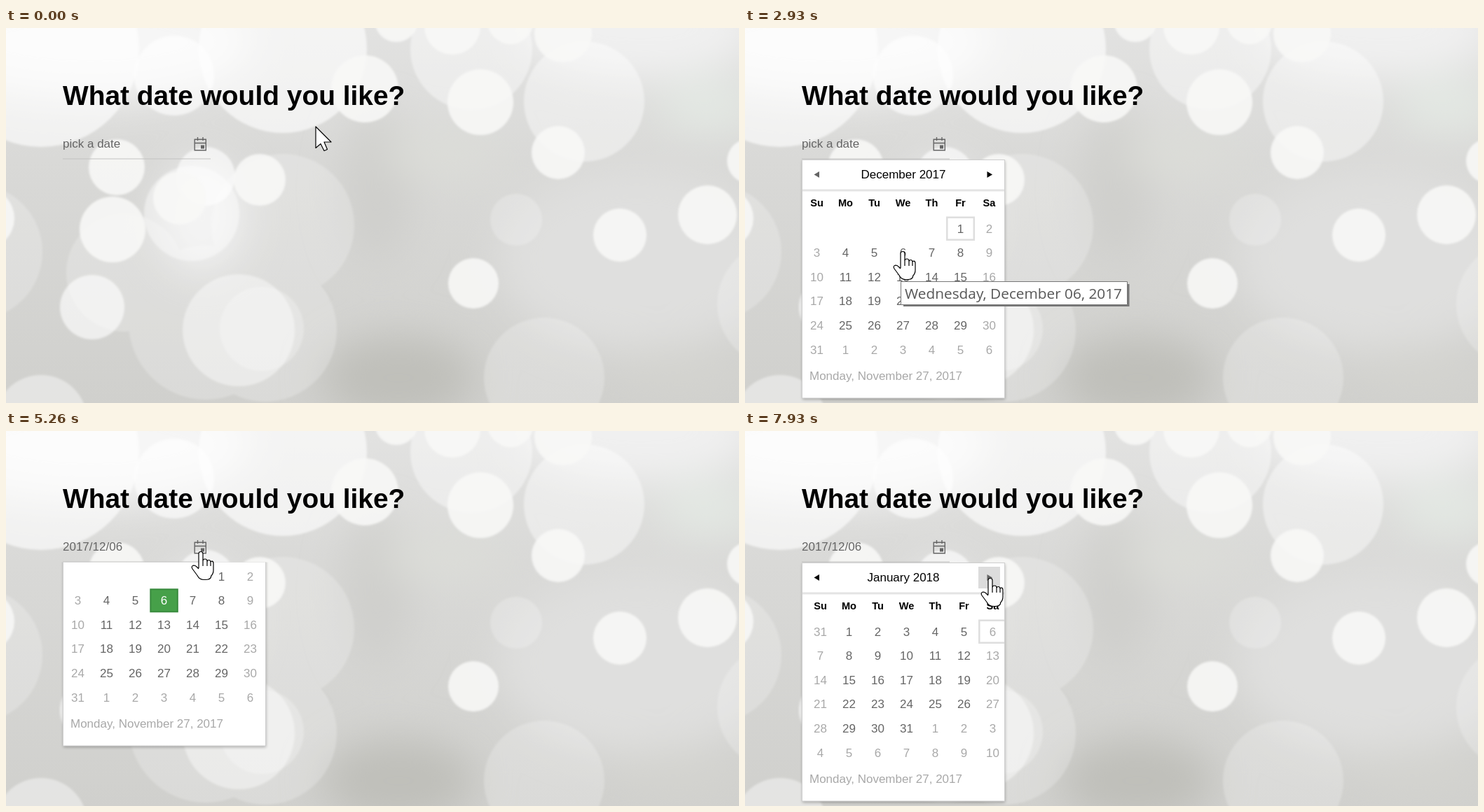
These frames come from a looping animation (1046 by 536 pixels, 8000 ms). An HTML page:

```html
<!DOCTYPE html>
<html lang="en">
<head>
<meta charset="utf-8">
<title>Date picker</title>
<style>
  html, body { margin: 0; width: 100%; height: 100%; overflow: hidden; background: #dadad8; }
  svg { display: block; width: 1046px; height: 536px; }
  text { font: 17px "Liberation Sans", Arial, sans-serif; fill: #656565; }
  .mid { text-anchor: middle; }
  .muted { fill: #a8a8a8; }
  .dark { fill: #000; }
  .week { font-size: 14.6px; font-weight: bold; fill: #000; }
  .title { font-size: 38.9px; font-weight: bold; fill: #000; }
  .tip { font: 20.8px "Open Sans", "Noto Sans", sans-serif; fill: #575757; }
  .focus { fill: #fff; stroke: #dedede; stroke-width: 2.5; }
  .hover { fill: #dcdcdc; }
  .cursor { fill: #fff; stroke: #000; stroke-width: 1.2; stroke-linejoin: round; }
</style>
</head>
<body>
<svg viewBox="0 0 1046 536">
  <defs>
    <filter id="soft" x="-10%" y="-10%" width="120%" height="120%"><feGaussianBlur stdDeviation="1.6"/></filter>
    <filter id="haze" x="-50%" y="-50%" width="200%" height="200%"><feGaussianBlur stdDeviation="28"/></filter>
    <filter id="shade" x="-5%" y="-5%" width="110%" height="110%"><feGaussianBlur stdDeviation="2"/></filter>
    <linearGradient id="base" x2="0" y2="1">
      <stop offset="0" stop-color="#e2e2e1"/>
      <stop offset=".35" stop-color="#d9d9d7"/>
      <stop offset="1" stop-color="#d0d0cd"/>
    </linearGradient>
    <clipPath id="drop"><path d="M70 187.5H385V536H70z"/></clipPath>
    <clipPath id="pane"><path d="M82 235H370V482H82z"/></clipPath>
  </defs>

  <rect width="1046" height="536" fill="url(#base)"/>
  <g filter="url(#haze)">
    <ellipse cx="560" cy="500" rx="110" ry="60" fill="#bfbfba"/>
    <ellipse cx="530" cy="230" rx="50" ry="110" fill="#cfcfcc"/>
    <ellipse cx="620" cy="180" rx="90" ry="30" fill="#dcddd8"/>
    <ellipse cx="900" cy="330" rx="200" ry="130" fill="#dfdfde"/>
    <ellipse cx="960" cy="490" rx="90" ry="40" fill="#d3d3cf"/>
    <ellipse cx="120" cy="20" rx="230" ry="80" fill="#f6f6f6"/>
    <ellipse cx="900" cy="0" rx="170" ry="70" fill="#f0f0f0"/>
    <ellipse cx="1000" cy="110" rx="70" ry="40" fill="#e3e8e3"/>
    <ellipse cx="280" cy="270" rx="60" ry="80" fill="#ececec"/>
  </g>
  <g fill="#fff" filter="url(#soft)">
    <g opacity=".22">
      <circle cx="395" cy="282" r="102"/>
      <circle cx="285" cy="421" r="110"/>
      <circle cx="370" cy="432" r="102"/>
      <circle cx="170" cy="350" r="84"/>
      <circle cx="-45" cy="320" r="97"/>
      <circle cx="768" cy="500" r="86"/>
      <circle cx="1105" cy="395" r="90"/>
      <circle cx="728" cy="274" r="37"/>
    </g>
    <g fill-opacity=".42">
      <circle cx="332" cy="432" r="80"/>
      <circle cx="265" cy="265" r="68"/>
      <circle cx="664" cy="30" r="87"/>
      <circle cx="825" cy="105" r="86"/>
      <circle cx="50" cy="562" r="66"/>
      <circle cx="365" cy="430" r="60" fill-opacity=".25"/>
    </g>
    <g fill-opacity=".62">
      <circle cx="395" cy="30" r="120"/>
      <circle cx="50" cy="30" r="140"/>
      <circle cx="240" cy="68" r="57"/>
      <circle cx="123" cy="399" r="46"/>
      <circle cx="285" cy="212" r="42"/>
    </g>
    <g fill="#f9f9f8" fill-opacity=".88">
      <circle cx="512" cy="87" r="48"/>
      <circle cx="677" cy="106" r="47"/>
      <circle cx="557" cy="-11" r="31"/>
      <circle cx="637" cy="-2" r="40"/>
      <circle cx="720" cy="-10" r="33"/>
      <circle cx="795" cy="8" r="41"/>
      <circle cx="788" cy="178" r="38"/>
      <circle cx="876" cy="296" r="38"/>
      <circle cx="1001" cy="267" r="42"/>
      <circle cx="667" cy="365" r="36"/>
      <circle cx="1061" cy="190" r="32"/>
      <circle cx="158" cy="199" r="40"/>
      <circle cx="152" cy="288" r="47"/>
      <circle cx="362" cy="217" r="37"/>
      <circle cx="248" cy="243" r="38"/>
      <circle cx="-32" cy="272" r="44"/>
    </g>
  </g>

  <text class="title" x="81" y="110">What date would you like?</text>
  <text id="field" x="81" y="171"></text>
  <path d="M81 187H292" stroke="#c2c2c1"/>
  <g fill="none" stroke="#656565" stroke-width="1.4">
    <path d="M269.2 159.2H285.3V174.8H269.2zM269.2 164.5H285.3M273.5 156V161M281 156V161"/>
    <path d="M278 167.5h5v5h-5z" fill="#656565" stroke="none"/>
  </g>

  <g clip-path="url(#drop)">
    <g id="popup">
      <rect x="82" y="190" width="289" height="341" fill="#000" opacity=".28" filter="url(#shade)"/>
      <rect x="81.5" y="188.5" width="289" height="340.5" fill="#fff" stroke="#cfcfcf"/>
      <rect id="titleHover" class="hover" x="124" y="194" width="205" height="31"/>
      <rect id="nextHover" class="hover" x="333" y="194" width="31" height="31"/>
      <path id="prev" d="M106 205V214L98.500 209.500z"/>
      <path id="next" d="M345.500 205V214L353 209.500z"/>
      <text id="month" class="mid dark" x="226" y="215"></text>
      <path d="M82 232H370" stroke="#e4e4e4" stroke-width="3"/>
      <g clip-path="url(#pane)">
        <g id="december"></g>
        <g id="january"></g>
      </g>
      <text class="muted" x="92" y="503">Monday, November 27, 2017</text>
    </g>
  </g>

  <g id="tip">
    <path d="M4 4H326.500V36H4z" fill="#777"/>
    <path d="M.5.5H323.500V33.500H.5z" fill="#fff" stroke="#777"/>
    <text class="tip" x="6" y="25">Wednesday, December 06, 2017</text>
  </g>
  <path id="arrow" class="cursor" d="M0 0V30.500L7 24.500 12 34.500 16.500 32.500 12 22H22z"/>
  <path id="hand" class="cursor" d="M-3 24V3.500Q-3 .5 0 .5T3 3.500V14Q3 11 6 11T9 14V15Q9 12.500 11.500 12.500T14 16Q14 14 16 14.200T18 17.500V27Q18 32 14.500 35.500V37Q13 40.500 7 40.500H4Q-2 40.500-5 34.500L-12 25Q-14 21.500-11 20.300-8 19.500-5.500 22.500L-3 25M3 14V21M9 15V21M14 16V21"/>
</svg>

<script>
const LOOP = 8000;
const $ = id => document.getElementById(id);
const show = (id, on) => $(id).style.display = on ? '' : 'none';
const place = (id, x, y) => $(id).setAttribute('transform', `translate(${x} ${y})`);

function add(parent, tag, attrs, text = '') {
  const el = document.createElementNS('http://www.w3.org/2000/svg', tag);
  for (const key in attrs) el.setAttribute(key, attrs[key]);
  el.textContent = text;
  parent.append(el);
  return el;
}

const colX = c => 102.5 + 41 * c;
const rowY = r => 286.7 + 34.6 * r;

function cellBox(parent, col, row, attrs) {
  return add(parent, 'rect', { x: colX(col) - 19.2, y: rowY(row) - 16, width: 38.5, height: 32, ...attrs });
}

// Builds one month; days before the first come from a 31-day month, or stay blank.
function fillMonth(id, lead, blankLead, focusCol) {
  const g = $(id), cells = [];
  ['Su', 'Mo', 'Tu', 'We', 'Th', 'Fr', 'Sa'].forEach((name, c) =>
    add(g, 'text', { class: 'mid week', x: colX(c), y: 255 }, name));
  const focus = cellBox(g, focusCol, 0, { class: 'focus' });
  const picked = cellBox(g, 3, 1, { fill: '#46a049', stroke: '#388a3d', 'stroke-width': 2 });
  for (let i = 0; i < 42; i++) {
    const n = i - lead + 1, c = i % 7;
    if (n < 1 && blankLead) continue;
    const muted = n < 1 || n > 31 || c === 0 || c === 6;
    cells[i] = add(g, 'text', {
      class: muted ? 'mid muted' : 'mid', x: colX(c), y: rowY(Math.floor(i / 7)) + 5.8
    }, n < 1 ? n + 31 : n > 31 ? n - 31 : n);
  }
  return { focus, picked, cells };
}

const dec = fillMonth('december', 5, true, 5);
const jan = fillMonth('january', 1, false, 6);
jan.picked.remove();

// Pointer moves: start, end, steps, then bezier points after the current position.
const START = [442, 141];
const moves = [
  [90, 550, 7, [430, 78], [330, 90], [281, 162]],
  [1900, 2280, 6, [285, 200], [250, 290], [210, 310]],
  [2440, 2600, 3, [225, 319]],
  [3690, 4243, 8, [250, 440], [460, 380], [311, 218]],
  [4322, 4480, 3, [288, 172]],
  [4570, 4710, 3, [278, 172]],
  [5720, 6350, 9, [285, 240], [148, 335], [237, 322]],
  [6886, 7050, 3, [342, 196]],
  [7300, 7300, 1, [351, 196]],
  [7530, 7530, 1, [350, 210]]
];

function bezier(points, p) {
  while (points.length > 1)
    points = points.slice(1).map((b, i) => b.map((v, k) => points[i][k] + (v - points[i][k]) * p));
  return points[0];
}

function pointer(t) {
  let pos = START;
  for (const [from, to, steps, ...path] of moves) {
    if (t < from) break;
    const k = t >= to ? steps : Math.floor((t - from) / (to - from) * (steps - 1)) + 1;
    pos = bezier([pos, ...path], k / steps);
  }
  return pos;
}

// Held values: each pair is a time and the value from then on.
const held = (pairs, t) => pairs.reduce((v, [at, next]) => t >= at ? next : v, pairs[0][1]);

const HIDDEN = -360;
const drop = [[0, HIDDEN], [1030, -310], [1090, -78.5], [1195, -2], [1280, 0],
  [3150, -30], [3220, -200], [3295, -330], [3370, HIDDEN],
  [5180, -310], [5250, -79], [5330, -3], [5410, 0]];
const tipFade = [[0, 0], [2690, .2], [2770, .5], [2850, .8], [2920, 1], [3080, 0],
  [6570, .22], [6650, .6], [6730, 1], [6886, 0]];
const slide = [[0, 289], [7530, 270], [7610, 170], [7690, 85], [7770, 38], [7850, 14], [7920, 5]];

function draw(t) {
  const picked = t >= 3080, turned = t >= 7530, overNext = t >= 7050;
  const y = held(drop, t), x = held(slide, t);

  $('field').textContent = picked ? '2017/12/06' : 'pick a date';
  show('popup', y > HIDDEN);
  place('popup', 0, y);
  place('january', x, 0);
  place('december', x - 289, 0);
  $('month').textContent = turned ? 'January 2018' : 'December 2017';
  $('prev').style.fill = turned ? '#000' : '#656565';
  $('next').style.fill = overNext ? '#656565' : '#000';
  show('nextHover', overNext);
  show('titleHover', t >= 1976 && t < 2052);
  dec.focus.style.display = picked ? 'none' : '';
  dec.picked.style.display = picked ? '' : 'none';
  dec.cells[10].style.fill = picked ? '#fff' : '';

  const fade = held(tipFade, t);
  show('tip', fade > 0);
  $('tip').style.opacity = fade;
  if (picked) place('tip', 235, 366); else place('tip', 222, 362);

  const [px, py] = pointer(t);
  const overIcon = px > 266 && px < 292 && py > 154 && py < 178;
  const overPopup = px > 81 && px < 371 && py > 188 && py < 529 + y;
  const isHand = overIcon || overPopup;
  show('hand', isHand);
  show('arrow', !isHand);
  place(isHand ? 'hand' : 'arrow', px, py);
}

const begin = performance.now();
function tick() {
  draw((performance.now() - begin) % LOOP);
  requestAnimationFrame(tick);
}
tick();
</script>
</body>
</html>
```
